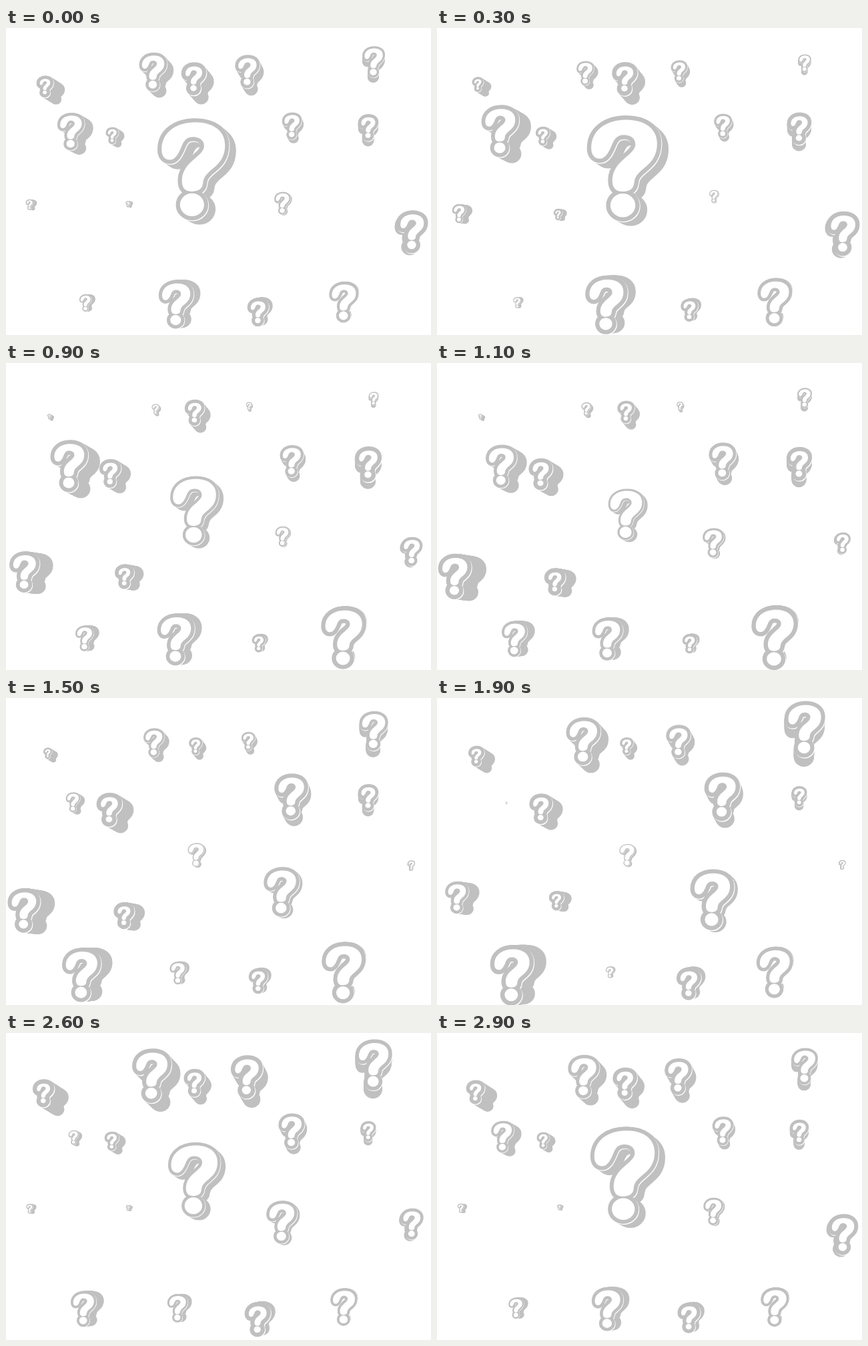
An HTML page with a canvas that plays this animation: 637 px wide and 460 px high, repeating every 3 s.

```html
<!DOCTYPE html>
<html lang="en">
<head>
<meta charset="utf-8">
<title>Question marks</title>
<style>
html, body { margin: 0; width: 100%; height: 100%; overflow: hidden; background: #fff; }
canvas { display: block; }
</style>
</head>
<body>
<canvas id="stage" width="637" height="460"></canvas>
<script>
const ctx = document.getElementById('stage').getContext('2d');
const LOOP = 3, STEP = 0.1;
const GREY = '#c0c0c0', WHITE = '#fff';
const VANISH = { x: 543, y: 390 };
const DEPTH = 0.046, EDGE = 6.5, RIM = 1.3, GLYPH_H = 148;

// Glyph centred on 0,0
const glyph = new Path2D(
  'M-50 -31C-50 -59 -26 -74 3 -74C32 -74 50 -60 50 -38C50 -12 33 -4 23 6' +
  'C16 13 16 17 15 23C14 32 6 35 -3 35C-14 35 -18 28 -18 18C-18 4 -10 -6 -2 -13' +
  'C8 -22 17 -28 17 -37C17 -46 9 -51 0 -51C-11 -51 -15 -45 -19 -35' +
  'C-24 -23 -29 -15 -37 -15C-45 -15 -50 -21 -50 -31Z' +
  'M17 56A19 18 0 1 1 -21 56A19 18 0 1 1 17 56Z');

// Rows of marks: x, largest height, time of the peak, smallest share of the height
const rows = [
  { y: 81, drop: 0, marks: [
    [67, 56, 2.48], [225.5, 101, 2.35], [287.3, 65, 0.2, 0.5], [365, 81, 2.45], [551, 106, 2.17]] },
  { y: 161, drop: 0, marks: [
    [104, 97, 0.6, 0], [163.6, 61, 1.46, 0.5], [430, 84, 1.82, 0.5], [543, 65, 0.75, 0.5]] },
  { y: 249, drop: 63, marks: [
    [38, 73, 1.27], [184.8, 45, 1.27], [415.5, 96, 1.98], [607.3, 71, 0.22]] },
  { y: 411, drop: 0, marks: [
    [122, 92, 1.85], [260.3, 92, 0.49], [380.8, 56, 2.33, 0.5], [507, 98, 1.15, 0.58]] },
  { y: 249, drop: 0, marks: [[286.4, 168, 0.22]] }
];

// Rows tilt less the lower they are; small marks hang lower than large ones
const marks = rows.flatMap(({ y, drop, marks }) =>
  marks.map(([x, size, peak, low = 0.18]) => {
    const base = y - x * (0.0565 - 0.00013 * y);
    const cy = drop + 0.42 * (102 - size);
    const dx = DEPTH * (VANISH.x - x);
    const dy = DEPTH * (VANISH.y - base - cy);
    const scale = (size - Math.abs(dy) - 2 * EDGE) / GLYPH_H;
    return { x, base, cy, dx, dy, scale, peak, low };
  }));

function stamp(x, y, scale, colour, edge) {
  ctx.save();
  ctx.translate(x, y);
  ctx.scale(scale, scale);
  ctx.fillStyle = ctx.strokeStyle = colour;
  ctx.lineWidth = 2 * edge / scale;
  if (edge) ctx.stroke(glyph);
  ctx.fill(glyph);
  ctx.restore();
}

function drawMark({ x, base, cy, dx, dy, scale, peak, low }, t) {
  const wave = (1 + Math.cos((t - peak) * 2 * Math.PI / LOOP)) / 2;
  const zoom = low + (1 - low) * wave;
  ctx.setTransform(zoom, 0, 0, zoom, x, base);
  const fx = -dx / 2, fy = cy - dy / 2;

  // extruded side, back to front
  const n = Math.ceil(Math.hypot(dx, dy) * zoom) + 1;
  for (let i = n; i > 0; i--) {
    const f = i / n;
    stamp(fx + dx * f, fy + dy * f, scale * (1 - 0.02 * f), GREY, EDGE);
  }
  // lit rim, outline, face
  stamp(fx + RIM * 0.8, fy + RIM, scale, WHITE, EDGE);
  stamp(fx, fy, scale, GREY, EDGE);
  stamp(fx, fy, scale, WHITE, 0);
}

function draw(t) {
  ctx.setTransform(1, 0, 0, 1, 0, 0);
  ctx.fillStyle = WHITE;
  ctx.fillRect(0, 0, 637, 460);
  ctx.lineJoin = 'round';
  for (const m of marks) drawMark(m, t);
}

let shown = -1;
function tick() {
  const step = Math.floor(performance.now() / 1000 % LOOP / STEP);
  if (step !== shown) {
    shown = step;
    draw(step * STEP);
  }
  requestAnimationFrame(tick);
}
tick();
</script>
</body>
</html>
```
